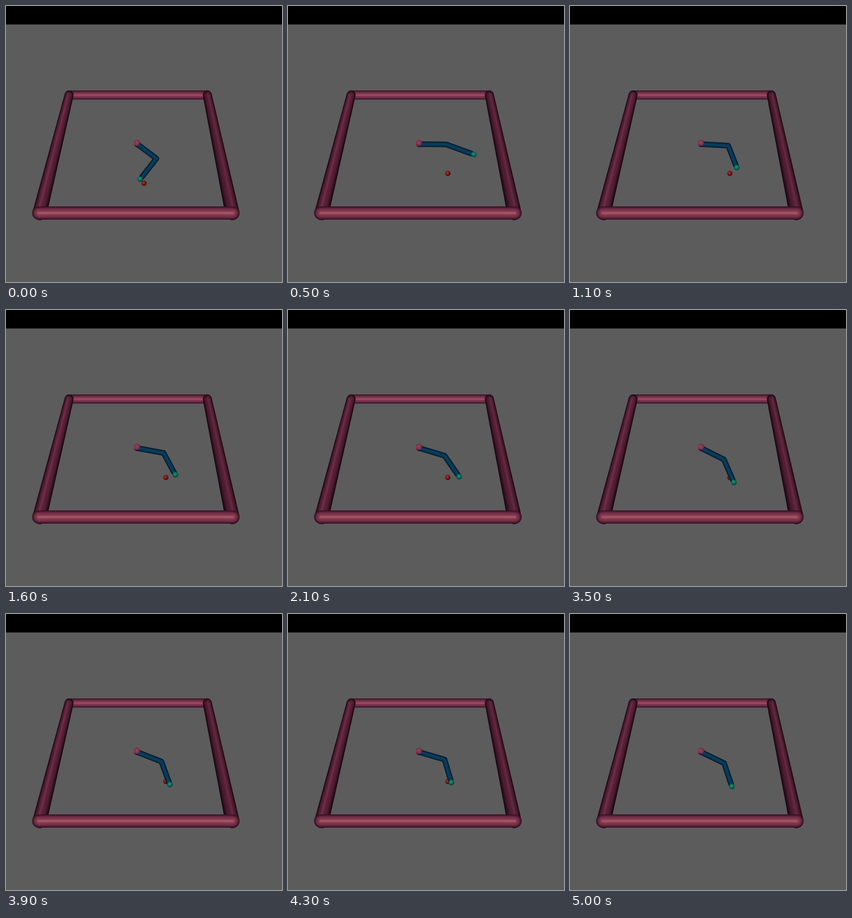
An HTML page for the animation above (5100 ms loop, 500x500 px).

```html
<!DOCTYPE html>
<html lang="en">
<head>
<meta charset="utf-8">
<title>Two-link arm</title>
<style>
html, body { margin: 0; width: 100%; height: 100%; overflow: hidden; background: #000; }
svg { display: block; width: 500px; height: 500px; }
</style>
</head>
<body>
<svg viewBox="0 0 500 500" xmlns="http://www.w3.org/2000/svg">
  <defs>
    <radialGradient id="tipFill" cx=".45" cy=".4" r=".6">
      <stop offset="0" stop-color="#249479"/><stop offset=".5" stop-color="#0c705f"/><stop offset="1" stop-color="#04352f"/>
    </radialGradient>
    <radialGradient id="goalFill" cx=".42" cy=".4" r=".6">
      <stop offset="0" stop-color="#a83a34"/><stop offset=".5" stop-color="#7c1817"/><stop offset="1" stop-color="#380808"/>
    </radialGradient>
    <radialGradient id="baseFill" cx=".45" cy=".45" r=".6">
      <stop offset="0" stop-color="#984260"/><stop offset=".6" stop-color="#84344f"/><stop offset="1" stop-color="#562034"/>
    </radialGradient>
  </defs>
  <rect width="500" height="500" fill="#5c5c5c"/>
  <rect width="500" height="33.5" fill="#000"/>
  <g id="walls"></g>
  <circle id="goal" r="4.8" fill="url(#goalFill)"/>
  <rect x="232" y="242.5" width="11" height="13.5" rx="5" fill="#6e2a42"/>
  <g id="arm" fill="none" stroke-linecap="round" stroke-linejoin="round"></g>
  <circle cx="237.3" cy="248" r="5.5" fill="url(#baseFill)"/>
  <circle id="tip" r="5.1" fill="url(#tipFill)"/>
</svg>
<script>
const $ = id => document.getElementById(id);
const LOOP = 5100, STEP = 100;

function add(parent, tag, attrs) {
  const el = document.createElementNS("http://www.w3.org/2000/svg", tag);
  for (const k in attrs) el.setAttribute(k, attrs[k]);
  parent.appendChild(el);
  return el;
}

const mix = (a, b, f) => a + (b - a) * f;
const rgb = (c, d, f) => `rgb(${c.map((v, i) => Math.round(mix(v, d[i], f)))})`;

// Rounded bar whose radius changes from r1 to r2
function barPath(x1, y1, r1, x2, y2, r2) {
  const len = Math.hypot(x2 - x1, y2 - y1);
  const nx = -(y2 - y1) / len, ny = (x2 - x1) / len;
  return `M${x1 + nx * r1} ${y1 + ny * r1}A${r1} ${r1} 0 0 1 ${x1 - nx * r1} ${y1 - ny * r1}` +
    `L${x2 - nx * r2} ${y2 - ny * r2}A${r2} ${r2} 0 0 1 ${x2 + nx * r2} ${y2 + ny * r2}Z`;
}

// Stacked bars from dark rim to lit ridge; shift moves the ridge sideways
function wall(x1, y1, r1, x2, y2, r2, rim, body, ridge, shift) {
  const n = 12;
  for (let i = 0; i < n; i++) {
    const f = i / (n - 1), k = 1 - 0.92 * f;
    const fill = f < 0.45 ? rgb(rim, body, f / 0.45) : rgb(body, ridge, ((f - 0.45) / 0.55) ** 2);
    const s1 = shift * r1 * f, s2 = shift * r2 * f;
    add($("walls"), "path", { d: barPath(x1 + s1, y1, r1 * k, x2 + s2, y2, r2 * k), fill });
  }
}

wall(114.5, 161.3, 8.2, 364.5, 161.3, 8.2, [52, 18, 34], [116, 46, 74], [156, 82, 98], 0);
wall(114.3, 161.3, 8.2, 61, 375, 13, [26, 8, 16], [82, 30, 52], [110, 46, 70], -0.25);
wall(364.7, 161.3, 8.2, 410, 375, 13, [26, 8, 16], [76, 28, 48], [102, 42, 64], 0.25);
wall(59.2, 375, 12, 411.2, 375, 12, [54, 18, 35], [120, 48, 74], [164, 88, 100], 0);

const strokes = [["#031724", 10], ["#06304b", 7.4], ["#0a3d5d", 3.6]].map(
  ([stroke, width]) => add($("arm"), "path", { stroke, "stroke-width": width }));

// Floor coordinates (y towards the viewer) to stage
function project(x, y) {
  const h = 1 / (0.0015969 - 0.000884 * y);
  const sy = h - 376;
  return [239.5 - 4 * (sy - 161) / 214 + x * h * 0.7788, sy];
}

// time, shoulder angle, forearm angle (degrees, clockwise)
const keys = [
  [100, 0, 1], [1100, 4.5, 76.7], [2100, 22.7, 65], [2900, 22.7, 80.5],
  [3500, 35, 74], [4300, 22.2, 80], [5000, 34, 78]
];

function slope(i, c) {
  if (i === 0 || i === keys.length - 1) return 0;
  const [p, k, n] = [keys[i - 1], keys[i], keys[i + 1]];
  const a = (k[c] - p[c]) / (k[0] - p[0]), b = (n[c] - k[c]) / (n[0] - k[0]);
  return a * b > 0 ? 2 * a * b / (a + b) : 0;
}

function sample(t, c) {
  let i = 0;
  while (i < keys.length - 2 && t > keys[i + 1][0]) i++;
  const [p, q] = [keys[i], keys[i + 1]];
  const d = q[0] - p[0], u = (t - p[0]) / d, v = 1 - u;
  return v * v * (1 + 2 * u) * p[c] + u * u * (3 - 2 * u) * q[c] +
    d * u * v * (v * slope(i, c) - u * slope(i + 1, c));
}

function place(el, [x, y]) {
  el.setAttribute("cx", x);
  el.setAttribute("cy", y);
}

function draw(ms) {
  const t = Math.floor((ms % LOOP) / STEP) * STEP;
  const reset = t >= STEP;
  const a = (reset ? sample(t, 1) : 46.3) * Math.PI / 180;
  const b = (reset ? sample(t, 2) : 121.3) * Math.PI / 180;
  const ex = 0.1 * Math.cos(a), ey = 0.1 * Math.sin(a);
  const reach = r => project(ex + r * Math.cos(b), ey + r * Math.sin(b));
  const d = `M${project(0, 0)}L${project(ex, ey)}L${reach(0.1)}`;
  strokes.forEach(s => s.setAttribute("d", d));
  place($("tip"), reach(0.11));
  place($("goal"), reset ? [289.5, 303.3] : [250, 321]);
}

function tick() {
  draw(performance.now());
  requestAnimationFrame(tick);
}
tick();
</script>
</body>
</html>
```
